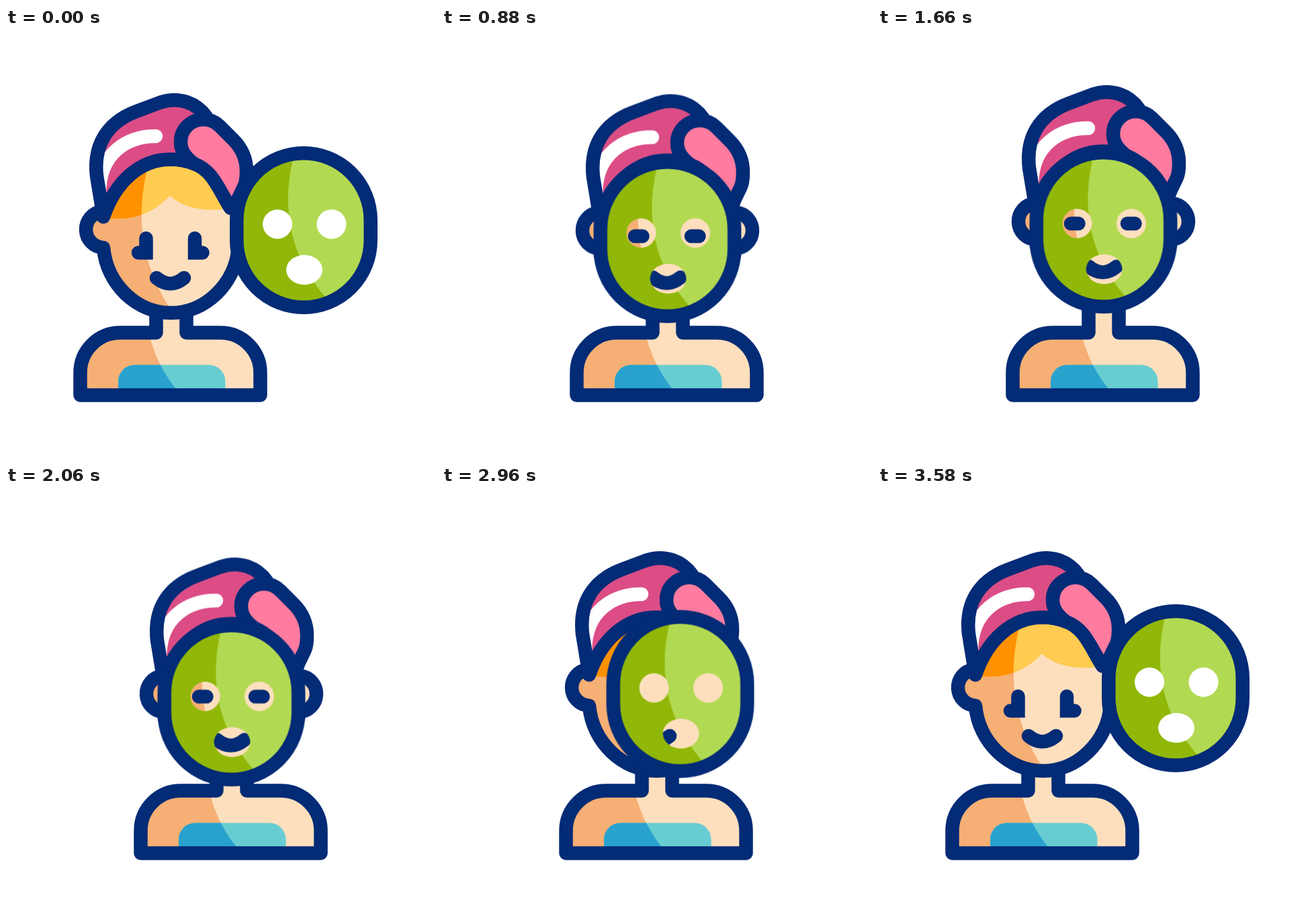
Recreate the animation shown at these times as an HTML page without scripts. Size 640 by 640 pixels, loop 3.62 s.

```html
<!DOCTYPE html>
<html lang="en">
<head>
<meta charset="utf-8">
<title>Face mask</title>
<style>
  html, body { margin: 0; width: 100%; height: 100%; overflow: hidden; background: #fff; }
  svg { display: block; width: 100%; height: 100%; }

  .line { fill: none; stroke: #032b76; stroke-width: 20.5; stroke-linecap: round; stroke-linejoin: round; }
  .skin { fill: #fddfbd; }
  .skin-shade { fill: #f6af74; }

  /* one loop: 0.2 s rest, slide in, four nods, slide out, rest */
  .woman, .head, .mask, .eyes, .mouth, .eye {
    animation: 3.62s cubic-bezier(.333, 0, .667, 1) infinite;
  }
  .woman { animation-name: slide; }
  .head { animation-name: nod; }
  .mask { animation-name: wear; }
  .eyes { animation-name: lift-eyes; }
  .mouth { animation-name: lift-mouth; }
  .eye { stroke-linejoin: miter; }
  .eye.left { animation-name: blink-left; }
  .eye.right { animation-name: blink-right; }

  @keyframes slide {
    0%, 5.525%, 93.923%, 100% { transform: none; }
    22.099%, 77.348% { transform: translateX(90px); }
  }
  @keyframes nod {
    0%, 22.099%, 77.348%, 100% { transform: none; }
    33.149% { transform: translateY(13.5px); }
    44.199%, 66.298% { transform: translateY(-13.5px); }
    55.249% { transform: translateY(11px); }
  }
  @keyframes wear {
    0%, 5.525%, 93.923%, 100% { transform: none; }
    22.099% { transform: translate(-107.5px, 11.7px); }
    33.149% { transform: translate(-107.5px, 25.5px); }
    44.199% { transform: translate(-107.5px, -2.6px); }
    55.249% { transform: translate(-107.5px, 22.7px); }
    66.298% { transform: translate(-107.5px, -1.5px); }
    77.348% { transform: translate(-107.5px, 10.4px); }
  }
  @keyframes lift-eyes {
    0% { transform: none; animation-timing-function: linear; }
    22.099% { transform: translateY(-4.5px); }
    44.199% { transform: translateY(-10px); }
    66.298% { transform: translateY(-8.5px); }
    84%, 100% { transform: none; }
  }
  @keyframes lift-mouth {
    0% { transform: none; animation-timing-function: linear; }
    22.099% { transform: translateY(-2.2px); }
    44.199% { transform: translateY(-5px); }
    66.298% { transform: translateY(-3px); }
    84%, 100% { transform: none; }
  }
  @keyframes blink-left {
    0%, 16.575%, 82.873%, 100% { d: path("M208.5 313V334.5H197"); }
    22.099%, 77.348% { d: path("M208.5 313V313H197"); }
  }
  @keyframes blink-right {
    0%, 16.575%, 82.873%, 100% { d: path("M281 313V334.5H292.5"); }
    22.099%, 77.348% { d: path("M281 313V313H292.5"); }
  }
</style>
</head>
<body>
<svg viewBox="0 0 640 640">
  <defs>
    <path id="torso" d="M110.5 546.5V513A59.5 59.5 0 0 1 170 453.5H223.5V395H268.5V453.5H319A59.5 59.5 0 0 1 378.5 513V546.5Z"/>
    <path id="top" d="M167 546V526A24.5 24.5 0 0 1 191.500 501.500H302A24.500 24.500 0 0 1 326.500 526V546Z"/>
    <path id="torso-shade" d="M100 440H210C216 478 232 514 261 547H100Z"/>
    <path id="face" d="M145 273A27.100 27.100 0 0 0 145 327C150 382 195 424 245.500 424S341 382 346 327A27.100 27.100 0 0 0 346 273C326 225 286 195 245 195S165 225 145 273Z"/>
    <path id="face-shade" d="M100 190H216C191 270 197 350 250 426H100Z"/>
    <path id="hair" d="M140 281C185 290 218 277 244 249.500C266 270 299 274 335 268V190H140Z"/>
    <path id="towel" d="M145 281L135 220C130 175 150 141 193 124.500L229 111C258 101 284 112 298 132L280 202C270 198 258 195.500 245 195.500C200 195.500 163 228 145 281Z"/>
    <path id="flap" d="M280 202C266 192 260 182 260 170A33.500 33.500 0 0 1 294 136C304 136 312 140 318 146L338 166C352 180 358 196 358 213C358 240 351 236 341 266L334 268C315 237 307 212 280 202Z"/>
    <path id="sheet" d="M343.300 286A99.700 99.700 0 0 1 542.700 286V316A99.700 99.700 0 0 1 343.300 316Z"/>
    <path id="sheet-cut" clip-rule="evenodd" fill-rule="evenodd" d="M343.300 286A99.700 99.700 0 0 1 542.700 286V316A99.700 99.700 0 0 1 343.300 316Z
      M382 292a22 22 0 1 0 44 0a22 22 0 1 0-44 0Z
      M462.500 292a22 22 0 1 0 44 0a22 22 0 1 0-44 0Z
      M417 360a27 22.300 0 1 0 54 0a27 22.300 0 1 0-54 0Z"/>
    <clipPath id="in-torso"><use href="#torso"/></clipPath>
    <clipPath id="in-top"><use href="#top"/></clipPath>
    <clipPath id="in-face"><use href="#face"/></clipPath>
    <clipPath id="in-hair"><use href="#hair"/></clipPath>
    <clipPath id="in-sheet"><use href="#sheet-cut"/></clipPath>
  </defs>

  <g class="woman">
    <use href="#torso" class="skin"/>
    <g clip-path="url(#in-torso)"><use href="#torso-shade" class="skin-shade"/></g>
    <use href="#top" fill="#67cdd2"/>
    <g clip-path="url(#in-top)"><use href="#torso-shade" fill="#29a2ce"/></g>
    <use href="#torso" class="line"/>

    <g class="head">
      <g clip-path="url(#in-face)">
        <use href="#face" class="skin"/>
        <use href="#face-shade" class="skin-shade"/>
        <use href="#hair" fill="#ffcb50"/>
        <g clip-path="url(#in-hair)"><use href="#face-shade" fill="#ff9100"/></g>
      </g>
      <g class="eyes">
        <path class="line eye left" d="M208.5 313V334.5H197"/>
        <path class="line eye right" d="M281 313V334.5H292.5"/>
      </g>
      <path class="line mouth" d="M224 372Q244.500 389 265 372"/>
      <path class="line" d="M143 273A27.100 27.100 0 0 0 145 327C150 382 195 424 245.500 424S341 382 346 327A27.100 27.100 0 0 0 348 273"/>

      <use href="#towel" fill="#dc4d86"/>
      <path d="M223 161C183 161 139 184 139 245" fill="none" stroke="#fff" stroke-width="20.5" stroke-linecap="round"/>
      <use href="#towel" class="line"/>
      <use href="#flap" fill="#ff7b9f"/>
      <use href="#flap" class="line"/>
    </g>
  </g>

  <g class="mask">
    <g clip-path="url(#in-sheet)">
      <use href="#sheet" fill="#b2d952"/>
      <path d="M330 180H431C407 265 420 345 488 414L480 430H330Z" fill="#91b708"/>
    </g>
    <use href="#sheet" class="line"/>
  </g>
</svg>
</body>
</html>
```
